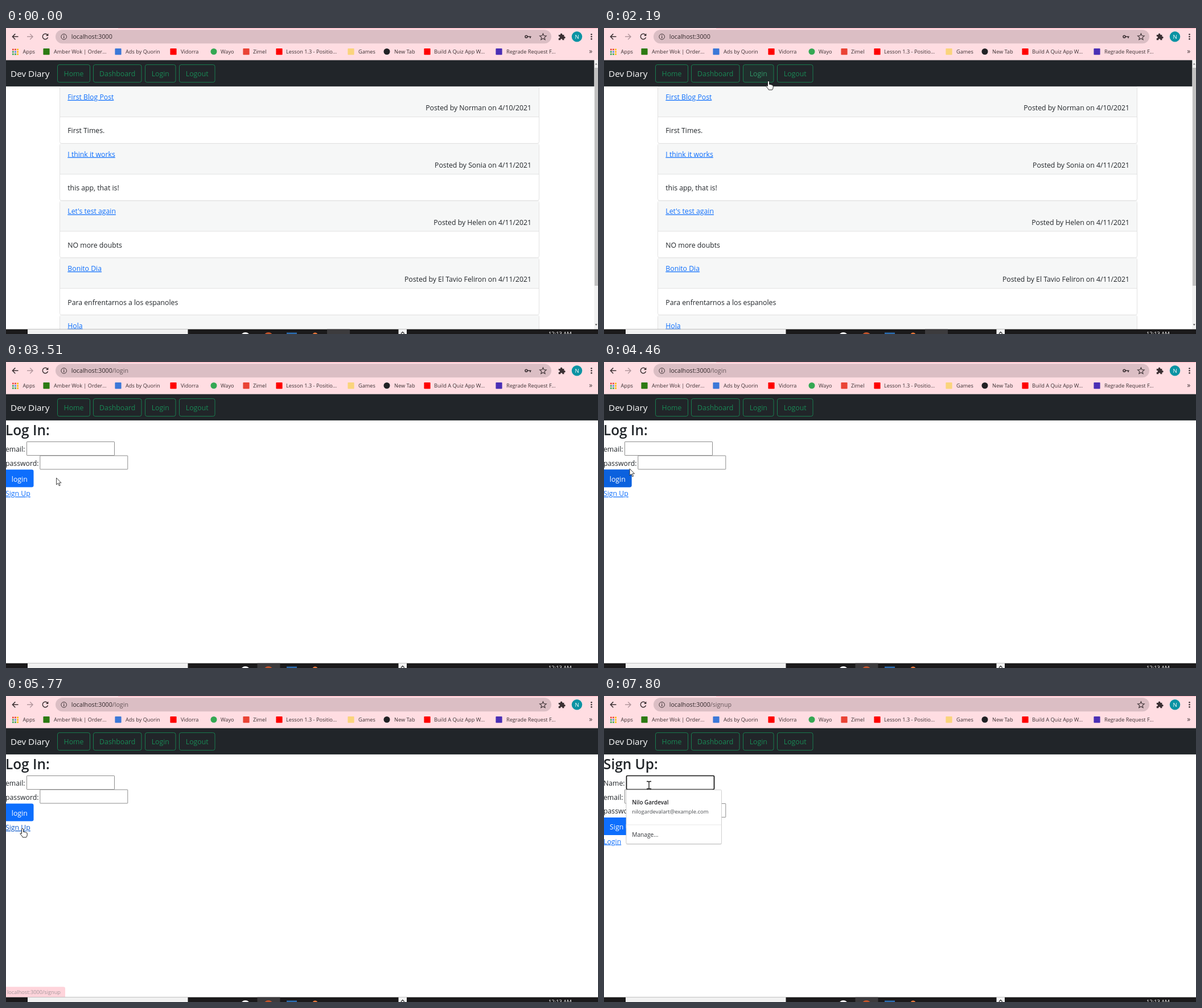
These frames come from a looping animation (1040 by 539 pixels, 8 s). An HTML page:

```html
<!DOCTYPE html>
<html lang="en">
<head>
<meta charset="utf-8">
<title>Blog login</title>
<style>
html, body { margin: 0; height: 100%; overflow: hidden; background: #fff; }
svg { display: block; width: 1040px; height: 539px; font-family: "Open Sans", "Noto Sans", sans-serif; }
text { white-space: pre; }
</style>
</head>
<body>
<svg viewBox="0 0 1040 539"><g id="page"></g><g id="chrome"></g><g id="live"></g></svg>
<script>
const LOOP = 8000, INK = '#212529', BLUE = '#0d6efd', GREEN = '#198754';
const $ = id => document.getElementById(id);
const clamp = v => Math.max(0, Math.min(1, v));

const rect = (x, y, w, h, fill, more = '') =>
  `<rect x="${x}" y="${y}" width="${w}" height="${h}" fill="${fill}" ${more}/>`;
const circle = (x, y, r, fill, more = '') =>
  `<circle cx="${x}" cy="${y}" r="${r}" fill="${fill}" ${more}/>`;
const path = (d, stroke, width = 1.4, fill = 'none') =>
  `<path d="${d}" stroke="${stroke}" stroke-width="${width}" fill="${fill}"/>`;
const text = (x, y, s, size = 12.25, fill = INK, more = '') =>
  `<text x="${x}" y="${y}" font-size="${size}" fill="${fill}" ${more}>${s}</text>`;
const MID = 'text-anchor="middle"', END = 'text-anchor="end"';
const LINE = 'text-decoration="underline"', BOLD = 'font-weight="600"';

const NAV_TOP = 56.4, BAR_TOP = 530.6;
const NAV = [['Home', 90.5, 57], ['Dashboard', 153.5, 84.5], ['Login', 244.5, 53.5], ['Logout', 304.5, 62.5]];
const NAV_LOGIN = [244, 64, 298, 93.5];
const POSTS = [
  ['First Blog Post', 'Norman on 4/10/2021', 'First Times.'],
  ['I think it works', 'Sonia on 4/11/2021', 'this app, that is!'],
  ["Let's test again", 'Helen on 4/11/2021', 'NO more doubts'],
  ['Bonito Dia', 'El Tavio Feliron on 4/11/2021', 'Para enfrentarnos a los espanoles'],
  ['Hola', '', '']
];
const FORMS = [null,
  { title: 'Log In:', fields: [['email:', 36], ['password:', 59.3]], button: 'login', w: 48.5, link: 'Sign Up', linkW: 44 },
  { title: 'Sign Up:', fields: [['Name:', 39], ['email:', 36], ['password:', 59.3]], button: 'Sign Up', w: 65, link: 'Login', linkW: 30 }
];
const BOOKMARKS = [
  ['Amber Wok | Order...', 71, 84, '#2c7a12'], ['Ads by Quorin', 197, 210, '#3c78d8'],
  ['Vidorra', 294, 307, '#f00'], ['Wayo', 365, 377, '#34a853'], ['Zimel', 422, 434, '#ea4335'],
  ['Lesson 1.3 - Positio...', 480, 492, '#f00'], ['Games', 606, 619, '#fad47c'],
  ['New Tab', 669, 682, '#202124'], ['Build A Quiz App W...', 740, 752, '#f00'],
  ['Regrade Request F...', 866, 879, '#4a2fb5']
];
// Pointer track: time, x, y
const TRACK = [
  [370, 989, 531], [540, 980, 515], [690, 631, 379], [840, 555, 342], [1010, 411, 256],
  [1160, 390, 238], [1330, 351, 208], [1480, 336, 185], [2150, 292, 98], [2190, 289, 93],
  [2340, 282, 88], [3040, 282, 88], [3600, 52, 226], [3910, 52, 226], [4200, 35, 205],
  [4460, 45, 188], [4770, 70, 166], [5050, 95, 155], [5300, 56, 200], [5540, 29, 233],
  [6340, 29, 233], [6720, 66, 169], [7030, 79, 157], [LOOP, 79, 157]
];
const CURSORS = {
  arrow: path('M0 0V12L2.8 9.4L4.8 14L6.6 13.2L4.7 8.8H8.5Z', '#111', .8, '#fff'),
  hand: path('M-1.5 1.2Q0-.6 1.5 1.2V6.5Q3 5.5 4 7Q5.5 6.2 6.3 7.8Q8 7.3 8.2 9V12Q8 14 6.5 16H.5Q-1 13-4 10Q-4.2 8-2.6 8.6L-1.5 9.8Z', '#111', .9, '#fff'),
  beam: path('M-4-6.5H-1.2L0-5.5L1.2-6.5H4M-4 6.5H-1.2L0 5.5L1.2 6.5H4M0-5.5V5.5', '#111', 1.3)
};

const pageAt = t => t < 2580 ? 0 : t < 6000 ? 1 : 2;

function pos(t) {
  const i = TRACK.findIndex(k => k[0] > t);
  if (i < 1) return TRACK[0].slice(1);
  const [a, x, y] = TRACK[i - 1], [b, u, v] = TRACK[i], p = (t - a) / (b - a);
  return [x + (u - x) * p, y + (v - y) * p];
}
function over([left, top, right, bottom], t) {
  const [x, y] = pos(t);
  return x >= left && x <= right && y >= top && y <= bottom;
}
// Share of the last 150 ms spent over a box: a linear hover transition
function glow(box, t) {
  let n = 0;
  for (let k = 0; k < 10; k++) n += over(box, t - k * 15);
  return n / 10;
}
const fieldY = i => 140.5 + i * 24.5;
function boxes(f) {
  const y = fieldY(f.fields.length);
  return {
    fields: f.fields.map(([, x], i) => [x, fieldY(i), x + 154, fieldY(i + 1)]),
    button: [0, y, f.w, y + 31],
    link: [0, y + 33, f.linkW, y + 51]
  };
}

function navBar(page, t) {
  const lit = page ? 0 : glow(NAV_LOGIN, t);
  return rect(0, NAV_TOP, page ? 1040 : 1033.3, 46.5, INK) + text(8, 86.2, 'Dev Diary', 15.3, '#fff') +
    NAV.map(([s, x, w]) => {
      const on = s === 'Login' ? lit : 0;
      return rect(x, 64.6, w, 31, GREEN, `fill-opacity="${on}" stroke="${GREEN}" stroke-width=".9" rx="3.3"`) +
        text(x + w / 2, 85.2, s, 12.3, GREEN, MID) +
        (on ? text(x + w / 2, 85.2, s, 12.3, '#fff', MID + ` opacity="${on}"`) : '');
    }).join('');
}

function home() {
  const edge = 'stroke="#dfdfdf" stroke-width=".9"';
  return POSTS.map(([title, by, body], i) => {
    const y = 103 + i * 100.7;
    return rect(94.5, y, 842, 100.3, '#fff', edge + ' rx="3"') +
      rect(95, y + .5, 841, 53, '#f6f7f7') + rect(95, y + 53.2, 841, .9, '#dfdfdf') +
      text(108.3, y + 22.8, title, 12.25, BLUE, LINE) +
      (by && text(923, y + 42.3, 'Posted by ' + by, 12.25, INK, END)) +
      text(108.3, y + 82.4, body);
  }).join('') +
    rect(1033.3, NAV_TOP, 7, 475, '#f1f1f1') + rect(1034, 70, 6, 384, '#c1c1c1') +
    path('M1034.8 64.5l2-2.5 2 2.5z', 'none', 0, '#777') + path('M1034.8 521.5l2 2.5 2-2.5z', 'none', 0, '#444');
}

function form(f, t, focused) {
  const b = boxes(f), y = b.button[1];
  return text(-1, 128.6, f.title, 24.4, INK, BOLD) +
    f.fields.map(([label, x], i) => {
      const on = focused && !i;
      const line = on ? '#101010' : over(b.fields[i], t) ? '#4a4a4a' : '#808080';
      return text(-1, fieldY(i) + 17.7, label) +
        rect(x + .5, fieldY(i), 154, 24, '#fff', `stroke="${line}" stroke-width="${on ? 1.7 : .9}" rx="${on ? 1.6 : .6}"`);
    }).join('') +
    rect(-5, y, f.w + 5, 31, BLUE, 'rx="3.3"') +
    rect(-5, y, f.w + 5, 31, '#0b5ed7', `rx="3.3" opacity="${glow(b.button, t)}"`) +
    text((f.w - 1) / 2, y + 21, f.button, 12.3, '#fff', MID) +
    text(-1, y + 46.6, f.link, 12.3, over(b.link, t) ? '#0a58ca' : BLUE, LINE);
}

function suggestions() {
  return rect(38.5, 165.5, 168.5, 96.5, '#000', 'opacity=".12" rx="3"') +
    rect(39, 165.3, 167.5, 95, '#fff', 'stroke="#c8c8c8" stroke-width=".8" rx="2"') +
    text(49.2, 190.5, 'Nilo Gardeval', 9.9, '#202124', BOLD) +
    text(49.2, 207.4, 'nilogardevalart@example.com', 9.5, '#4a4d51') +
    rect(39.5, 226.5, 166.5, .9, '#e6e6e6') + text(49.2, 248, 'Manage...', 10.2, '#33363a');
}

function bubble(s, w, alpha) {
  return alpha <= 0 ? '' : `<g opacity="${alpha}">` +
    path(`M0 512.3H${w - 3}q3 0 3 3V${BAR_TOP}H0z`, 'none', 0, '#ffabba') +
    text(2, 524.6, s, 9.2, '#4b363b') + '</g>';
}

function browser() {
  const dark = '#3b3033';
  let s = rect(0, 0, 1040, NAV_TOP, '#ffdde2') + rect(197, 0, 843, 1, '#ffb4c1') +
    rect(87, 3.2, 871, 24, '#dbbec4', 'rx="12"') +
    path('M21.5 15.3H11.5M16.3 10.4L11.4 15.3L16.3 20.2', dark, 1.5) +
    path('M37 15.3H47M42.2 10.4L47.1 15.3L42.2 20.2', '#b3979d', 1.4) +
    path('M73 12.2A4.8 4.8 0 1 0 73.6 16.6', dark, 1.5) + path('M74.4 9.6V14H70z', 'none', 0, dark) +
    circle(101.7, 15.4, 4.8, 'none', `stroke="${dark}" stroke-width="1"`) +
    rect(101.1, 14.5, 1.2, 3.6, dark) + rect(101.1, 12.4, 1.2, 1.2, dark) +
    path('M943.4 9.8L945 13.6L949.2 14L946 16.7L947 20.7L943.4 18.5L939.8 20.7L940.8 16.7L937.6 14L941.8 13.6Z', dark, 1.1) +
    path('M970.8 12h3v-.7a1.8 1.8 0 0 1 3.6 0v.7h3v3h.5a1.8 1.8 0 0 1 0 3.6h-.5v2.6h-3v-.6a1.6 1.6 0 0 0-3.2 0v.6h-3.4v-3.2h.6a1.6 1.6 0 0 0 0-3.2h-.6z', 'none', 0, dark) +
    circle(1003, 15.2, 9.2, '#0b93a3') + text(1003, 18.7, 'N', 9.5, '#fff', MID) +
    [11.2, 15.3, 19.4].map(y => circle(1028.5, y, 1.3, dark)).join('');
  const dots = ['#ea4335', '#ea4335', '#fbbc04', '#34a853', '#4285f4', '#fbbc04', '#34a853', '#34a853', '#fbbc04'];
  s += dots.map((c, i) => rect(11 + i % 3 * 4.1, 36.6 + (i / 3 | 0) * 4.1, 2.7, 2.7, c)).join('') + text(29.5, 45, 'Apps', 9.2, dark);
  s += BOOKMARKS.map(([label, x, tx, c], i) =>
    (i === 3 || i === 7 ? circle(x, 41.5, 5.5, c) : rect(x - 5.6, 36, 11.2, 11.2, c, 'rx="1"')) +
    text(tx, 45, label, 9.2, dark)).join('') + text(1024.3, 45, '»', 12, dark);
  return s;
}

function taskbar(page) {
  return rect(0, BAR_TOP, 1040, 9, '#1b1a1b') + rect(38, BAR_TOP, 281.5, 9, '#f1f1f1') +
    rect(page ? 441.5 : 564, BAR_TOP, 40, 9, '#3c3b3d') +
    circle(420.5, 544, 8, '#f4f4f4') + circle(461, 544, 8, '#c4552b') +
    rect(493, 536.5, 18, 3, '#2b6cb0') + circle(543, 541, 4.6, '#e8773a') +
    rect(689.5, BAR_TOP, 14.5, 9, '#f3f3f3') + path('M693.8 538.5L696.8 535.5L699.8 538.5', '#333', 1.3) +
    text(953, 541.8, '12:13 AM', 9.4, '#fff');
}

function cursor(page, t) {
  if (t < 370) return '';
  const b = page && boxes(FORMS[page]);
  const kind = over(NAV_LOGIN, t) || b && (over(b.button, t) || over(b.link, t)) ? 'hand'
    : b && b.fields.some(r => over(r, t)) ? 'beam' : 'arrow';
  return `<g transform="translate(${pos(t)})">${CURSORS[kind]}</g>`;
}

$('chrome').innerHTML = browser();

function draw(t) {
  const page = pageAt(t), focused = t >= 7250;
  $('page').innerHTML = (page ? form(FORMS[page], t, focused) : home()) + navBar(page, t);
  const tail = ['', '/login', '/signup'][page];
  $('live').innerHTML =
    text(114.7, 19.2, `localhost:3000<tspan fill="#66565a">${tail}</tspan>`, 10.7, '#33292c') +
    (t < 4620 ? circle(914, 15.3, 2, 'none', 'stroke="#3b3033" stroke-width="1.6"') +
      path('M916 15.3H922.6M921 15.3V18', '#3b3033', 1.6) : '') +
    (t >= 7400 ? suggestions() : '') +
    (focused && t < 7800 ? rect(42.3, 144.5, .9, 17, '#111') : '') +
    bubble('localhost:3000/login', 96.5, Math.min(clamp((t - 2480) / 150), clamp((3250 - t) / 150))) +
    bubble('localhost:3000/signup', 104, Math.min(clamp((t - 5695) / 150), clamp((6550 - t) / 150))) +
    taskbar(page) + cursor(page, t);
}

const start = performance.now();
function tick() {
  draw((performance.now() - start) % LOOP);
  requestAnimationFrame(tick);
}
tick();
</script>
</body>
</html>
```
